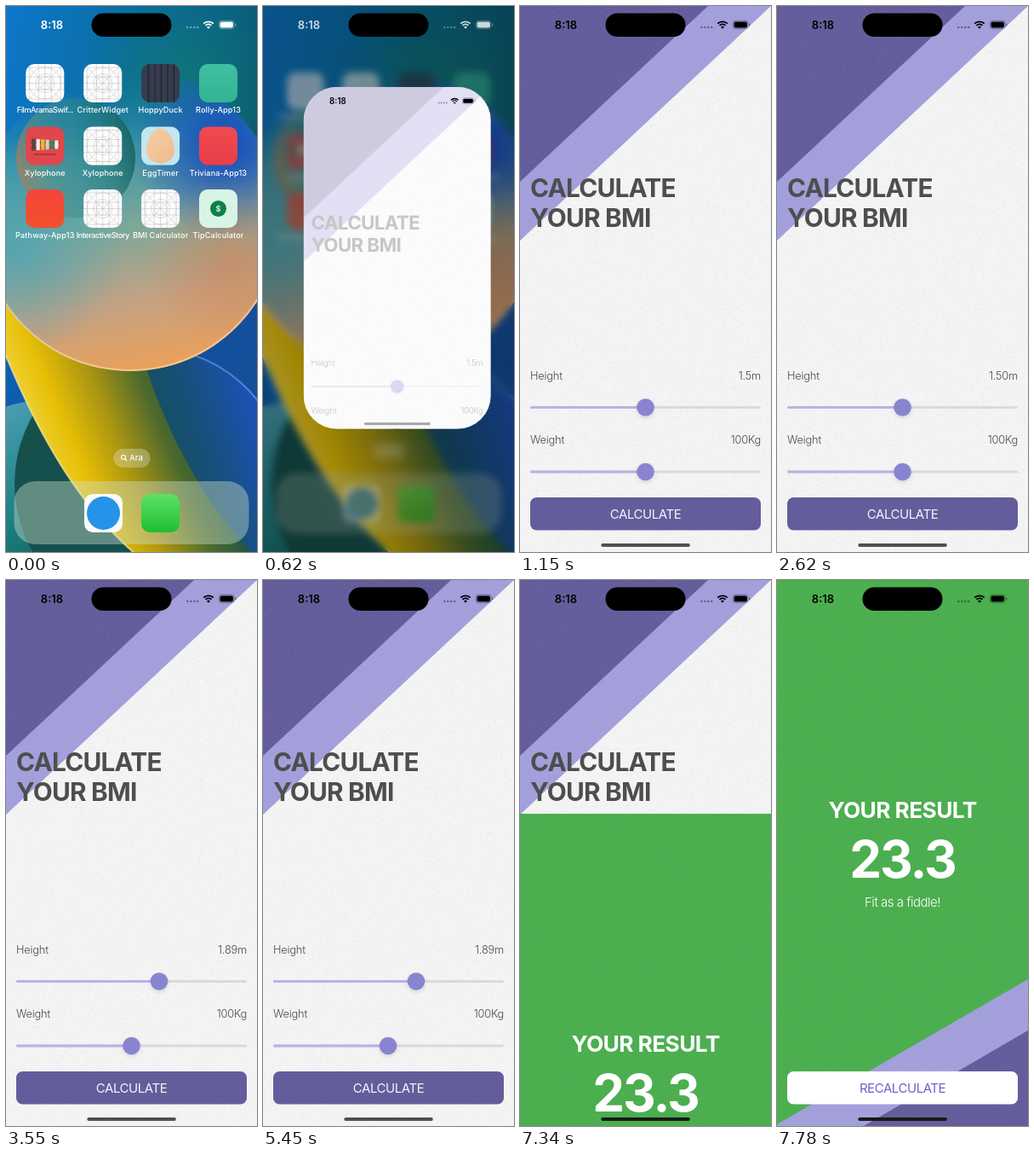
Write an HTML page with a canvas that moves like this. It is 295x640 px and loops after 8000 ms.

```html
<!DOCTYPE html>
<html lang="tr">
<head>
<meta charset="utf-8">
<title>BMI Calculator</title>
<style>
html, body { margin: 0; width: 100%; height: 100%; overflow: hidden; background: #000; }
canvas { display: block; width: 295px; height: 640px; }
</style>
</head>
<body>
<canvas id="stage"></canvas>
<script>
const W = 295, H = 640, LOOP = 8000, TAU = Math.PI * 2;
const FONT = 'Inter, "Liberation Sans", sans-serif';
const DARK = '#645d9b', LIGHT = '#a29fdb', GREEN = '#4bae4f', INK = '#4e4e4e';
const dpr = window.devicePixelRatio || 1;

const STEPS = [0, 500, 620, 720, 830, 940, 1040, 1150, 2620,
  2880, 2990, 3100, 3210, 3330, 3440, 3550,
  5450, 5560, 5670, 5780, 5900, 6120,
  7120, 7230, 7340, 7450, 7560, 7670, 7780];

const clamp = v => Math.max(0, Math.min(1, v));
const lerp = (a, b, k) => a + (b - a) * k;
const smooth = (t, from, to) => { const k = clamp((t - from) / (to - from)); return k * k * (3 - 2 * k); };
// Critically damped spring, 0 to 1.
const spring = (t, start, rate) => {
  const a = Math.max(0, t - start) / 1000 * rate;
  return 1 - (1 + a) * Math.exp(-a);
};

function layer(canvas = document.createElement('canvas')) {
  canvas.width = W * dpr;
  canvas.height = H * dpr;
  const c = canvas.getContext('2d');
  c.scale(dpr, dpr);
  return c;
}

function box(c, x, y, w, h, r, fill) {
  c.beginPath();
  c.roundRect(x, y, w, h, r);
  c.fillStyle = fill;
  c.fill();
}

function disc(c, x, y, r, fill) {
  c.beginPath();
  c.arc(x, y, r, 0, TAU);
  c.fillStyle = fill;
  c.fill();
}

function poly(c, pts, fill) {
  c.beginPath();
  pts.forEach(p => c.lineTo(...p));
  c.fillStyle = fill;
  c.fill();
}

function text(c, str, x, y, size, weight, fill, align = 'center', track = 0) {
  c.font = `${weight} ${size}px ${FONT}`;
  c.letterSpacing = track * size + 'px';
  c.textAlign = align;
  c.textBaseline = 'alphabetic';
  c.fillStyle = fill;
  c.fillText(str, x, y + size * 0.364);
}

function linear(c, x0, y0, x1, y1, ...colors) {
  const g = c.createLinearGradient(x0, y0, x1, y1);
  colors.forEach((col, i) => g.addColorStop(i / (colors.length - 1), col));
  return g;
}

function glow(c, x, y, r, rgb, alpha) {
  const g = c.createRadialGradient(x, y, 0, x, y, r);
  g.addColorStop(0, `rgba(${rgb},${alpha})`);
  g.addColorStop(1, `rgba(${rgb},0)`);
  c.fillStyle = g;
  c.fillRect(x - r, y - r, r * 2, r * 2);
}

// ---------- wallpaper ----------
function drawWallpaper(c) {
  c.fillStyle = linear(c, 0, 60, W, 120, '#0d76c6', '#0a6d9e', '#0b5a72');
  c.fillRect(0, 0, W, H);
  glow(c, 205, 95, 120, '18,122,112', 0.75);
  c.fillStyle = linear(c, 0, 400, W, 640, '#0b62b4', '#144f9e', '#15508c');
  c.fillRect(0, 340, W, 300);

  disc(c, 40, 585, 122, linear(c, 0, 470, 120, 640, '#4a9db4', '#1f8284', '#0f5f58'));

  // Blue rim at the lower right.
  disc(c, 170, 560, 160, linear(c, 150, 520, 300, 470, '#15504c', '#174f78', '#1d52ba'));
  c.beginPath();
  c.arc(170, 560, 159, -1.25, -0.45);
  c.strokeStyle = 'rgba(110,170,240,.6)';
  c.lineWidth = 2;
  c.stroke();

  const ribbon = new Path2D('M-5 330C50 400 130 420 165 425C190 500 235 590 295 645L155 645C90 590 40 510 -5 398');
  c.fillStyle = linear(c, 25, 520, 215, 440, '#f1d84c', '#e6bf05', '#a99412', '#4d6a2c', '#15504c');
  c.fill(ribbon);
  c.strokeStyle = 'rgba(246,236,160,.7)';
  c.lineWidth = 2;
  c.stroke(new Path2D('M155 645C90 590 40 510 -5 398'));

  c.save();
  c.beginPath();
  c.arc(146, 251, 177, 0, TAU);
  c.clip();
  c.fillStyle = linear(c, 110, 80, 175, 430, 'rgba(18,116,170,0)', '#3a93a8', '#7aa79a', '#c3a284', '#eda057');
  c.fillRect(-40, 60, 380, 380);
  glow(c, 258, 165, 110, '20,70,190', 1);
  glow(c, 10, 285, 130, '72,164,184', 0.75);
  glow(c, 265, 300, 100, '205,132,88', 0.6);
  c.restore();
  c.beginPath();
  c.arc(146, 251, 176, 0.15, Math.PI - 0.3);
  c.strokeStyle = 'rgba(255,215,165,.7)';
  c.lineWidth = 2;
  c.stroke();

  disc(c, 82, 178, 70, linear(c, 12, 195, 152, 165, 'rgba(176,126,84,.75)', 'rgba(84,146,136,.6)', 'rgba(56,140,144,.55)', 'rgba(36,122,120,.6)', 'rgba(20,92,84,.8)'));
}

// ---------- home screen ----------
function gridIcon(c, x, y) {
  box(c, x, y, 45, 45, 10, '#fdfdfd');
  c.save();
  c.beginPath();
  c.roundRect(x, y, 45, 45, 10);
  c.clip();
  c.translate(x + 22.5, y + 22.5);
  c.strokeStyle = '#b8b8bc';
  c.lineWidth = 0.5;
  c.beginPath();
  for (const d of [-18.5, -7.5, 0, 7.5, 18.5]) {
    c.moveTo(d, -23); c.lineTo(d, 23);
    c.moveTo(-23, d); c.lineTo(23, d);
  }
  for (const s of [-1, 1]) { c.moveTo(-23, -23 * s); c.lineTo(23, 23 * s); }
  for (const r of [7.5, 11, 18.5]) { c.moveTo(r, 0); c.arc(0, 0, r, 0, TAU); }
  c.stroke();
  c.restore();
}

const plain = (...colors) => (c, x, y) => box(c, x, y, 45, 45, 10, linear(c, x, y, x, y + 45, ...colors));

function planksIcon(c, x, y) {
  box(c, x, y, 45, 45, 10, '#363c4e');
  for (let i = 1; i < 6; i++) {
    c.fillStyle = i % 2 ? '#20242f' : '#272b38';
    c.fillRect(x + i * 7.5, y, 1.5, 45);
  }
}

function barsIcon(c, x, y) {
  box(c, x, y, 45, 45, 10, '#e0474d');
  c.fillStyle = '#6b2a2c';
  c.fillRect(x + 6, y + 18, 33, 1.2);
  c.fillRect(x + 6, y + 24, 33, 1.2);
  ['#54463f', '#f0efe4', '#e7b548', '#d9cfb2', '#2f8a6b', '#f0efe4'].forEach((col, i) =>
    box(c, x + 7 + i * 5.4, y + 14 + i * 0.4, 4.2, 14 - i * 0.8, 1, col));
  c.fillStyle = '#7a2f30';
  c.fillRect(x + 9, y + 32, 26, 1);
}

function eggIcon(c, x, y) {
  box(c, x, y, 45, 45, 10, '#c3e6ef');
  c.beginPath();
  c.moveTo(x + 22.5, y + 2);
  c.bezierCurveTo(x + 32, y + 2, x + 39, y + 17, x + 39, y + 27);
  c.bezierCurveTo(x + 39, y + 48, x + 6, y + 48, x + 6, y + 27);
  c.bezierCurveTo(x + 6, y + 17, x + 13, y + 2, x + 22.5, y + 2);
  c.fillStyle = linear(c, x + 6, y, x + 39, y + 40, '#f6cfa6', '#eebb8e');
  c.fill();
}

function coinIcon(c, x, y) {
  box(c, x, y, 45, 45, 10, '#d8f4e5');
  disc(c, x + 22.5, y + 22.5, 9.5, '#0f7f4b');
  text(c, '$', x + 22.5, y + 22.5, 9, 700, '#d8f4e5');
}

const APPS = [
  ['FilmAramaSwif...', gridIcon], ['CritterWidget', gridIcon], ['HoppyDuck', planksIcon], ['Rolly-App13', plain('#3fc0a0', '#35b394')],
  ['Xylophone', barsIcon], ['Xylophone', gridIcon], ['EggTimer', eggIcon], ['Triviana-App13', plain('#f04a50', '#e83e48')],
  ['Pathway-App13', plain('#f2453c', '#f5502c')], ['InteractiveStory', gridIcon], ['BMI Calculator', gridIcon], ['TipCalculator', coinIcon]
];

function drawHome(c) {
  APPS.forEach(([name, icon], i) => {
    const x = 23.3 + (i % 4) * 67.9, y = 68 + Math.floor(i / 4) * 73.5;
    icon(c, x, y);
    text(c, name, x + 22.5, y + 54, 9.1, 500, '#fff', 'center', name.length > 14 ? -0.05 : 0.015);
  });

  box(c, 126.5, 519, 43, 22, 11, 'rgba(255,255,255,.27)');
  c.strokeStyle = '#fff';
  c.lineWidth = 1.1;
  c.beginPath();
  c.arc(138, 529, 2.5, 0, TAU);
  c.moveTo(140, 531);
  c.lineTo(142.3, 533.3);
  c.stroke();
  text(c, 'Ara', 153, 530, 9.5, 500, '#fff');

  box(c, 9.5, 557, 276, 74, 25, 'rgba(205,225,205,.42)');
  box(c, 92, 572, 45, 45, 10, '#fafafa');
  disc(c, 114.5, 594.5, 19.5, '#2793e8');
  plain('#5ce266', '#1fbe33')(c, 159, 572);
}

// ---------- app screens ----------
function drawStatus(c, color) {
  text(c, '8:18', 54, 22, 13, 600, color);
  c.save();
  c.globalAlpha *= 0.4;
  for (let i = 0; i < 4; i++) disc(c, 213.3 + i * 4, 25, 1.2, color);
  c.restore();

  c.strokeStyle = color;
  c.lineWidth = 1.8;
  for (const r of [5, 8.2]) {
    c.beginPath();
    c.arc(238, 26.5, r, -Math.PI * 0.75, -Math.PI * 0.25);
    c.stroke();
  }
  c.beginPath();
  c.moveTo(238, 26.8);
  c.arc(238, 26.8, 2.8, -Math.PI * 0.75, -Math.PI * 0.25);
  c.fillStyle = color;
  c.fill();

  c.save();
  c.globalAlpha *= 0.4;
  c.lineWidth = 0.8;
  c.beginPath();
  c.roundRect(250.2, 17.3, 18, 9.4, 3);
  c.stroke();
  box(c, 269.2, 20.5, 1.2, 3, 0.6, color);
  c.restore();
  box(c, 251.5, 18.6, 15.4, 6.8, 1.9, color);
}

const grain = (() => {
  const c = layer();
  let seed = 7;
  const rnd = () => (seed = seed * 16807 % 2147483647) / 2147483647;
  for (let i = 0; i < 26000; i++) {
    c.fillStyle = rnd() < 0.62 ? 'rgba(255,255,255,.4)' : 'rgba(0,0,0,.045)';
    c.fillRect(Math.floor(rnd() * W), Math.floor(rnd() * H), 1, 1);
  }
  return c.canvas;
})();

function drawGrain(c, alpha) {
  c.save();
  c.globalAlpha = alpha;
  c.drawImage(grain, 0, 0, W, H);
  c.restore();
}

function slider(c, y, k) {
  const x = 22.5 + 250 * k;
  box(c, 12, y - 1.5, 271, 3, 1.5, '#dadada');
  box(c, 12, y - 1.5, x - 12, 3, 1.5, '#b8b3e6');
  c.save();
  c.shadowColor = 'rgba(0,0,0,.12)';
  c.shadowBlur = 5 * dpr;
  c.shadowOffsetY = 2 * dpr;
  disc(c, x, y, 10.3, '#8984d0');
  c.restore();
}

function row(c, y, name, value) {
  text(c, name, 12, y, 12.8, 300, '#4a4a4a', 'left', -0.015);
  text(c, value, 283, y, 12.8, 300, '#4a4a4a', 'right', -0.015);
}

function drawForm(c, t) {
  const height = lerp(1.5, 1.89, smooth(t, 2800, 3550));
  const weight = lerp(100, 83.2, smooth(t, 5400, 5960));
  c.fillStyle = '#f3f3f3';
  c.fillRect(0, 0, W, H);
  drawGrain(c, 0.8);
  poly(c, [[0, 0], [295, 0], [0, 275]], LIGHT);
  poly(c, [[0, 0], [221, 0], [0, 206]], DARK);
  drawGrain(c, 0.1);

  text(c, 'CALCULATE', 12, 213, 29.8, 700, INK, 'left', -0.026);
  text(c, 'YOUR BMI', 12, 248.5, 29.8, 700, INK, 'left', -0.026);
  row(c, 433, 'Height', t < 2620 ? '1.5m' : height.toFixed(2) + 'm');
  slider(c, 470.5, height / 3);
  row(c, 508.5, 'Weight', weight.toFixed(0) + 'Kg');
  slider(c, 546, weight / 200);
  box(c, 12, 576, 271, 38.5, 7.5, DARK);
  text(c, 'CALCULATE', 147.5, 595.5, 15, 400, t >= 7120 ? '#a9a5c6' : '#f5f4fa', 'center', -0.03);
}

function drawResult(c) {
  c.fillStyle = GREEN;
  c.fillRect(0, 0, W, H);
  poly(c, [[295, 468], [295, 640], [0, 640], [0, 638]], LIGHT);
  poly(c, [[295, 528], [295, 640], [102, 640]], DARK);
  drawGrain(c, 0.1);
  text(c, 'YOUR RESULT', 147.5, 269, 26.3, 700, '#fff', 'center', -0.023);
  text(c, '23.3', 147.5, 327, 60, 700, '#fff', 'center', -0.035);
  text(c, 'Fit as a fiddle!', 147.5, 378, 15, 300, '#fff', 'center', -0.033);
  box(c, 12, 576, 271, 38.5, 7.5, '#fff');
  text(c, 'RECALCULATE', 147.5, 595.5, 15, 400, '#6a63c8', 'center', -0.03);
}

const homeBar = (c, y, color) => box(c, 95.3, y, 104.5, 4, 2, color);

// ---------- scenes ----------
const wall = layer(), home = layer(), form = layer();
drawWallpaper(wall);
drawHome(home);

function drawBackdrop(c, open) {
  c.drawImage(wall.canvas, 0, 0, W, H);
  c.save();
  if (open > 0) {
    c.filter = `blur(${6 * open * dpr}px)`;
    c.drawImage(wall.canvas, 0, 0, W, H);
  }
  const s = 1 - 0.057 * open;
  c.globalAlpha = 1 - 0.5 * open;
  c.translate(W / 2, H / 2);
  c.scale(s, s);
  c.drawImage(home.canvas, -W / 2, -H / 2, W, H);
  c.restore();
  c.fillStyle = `rgba(0,0,0,${0.6 * open * open})`;
  c.fillRect(0, 0, W, H);
  c.save();
  c.globalAlpha = 1 - 0.3 * open;
  drawStatus(c, '#fff');
  c.restore();
}

function drawLaunch(c, t) {
  const k = spring(t, 455, 14.8), kh = spring(t, 481, 14.5);
  drawBackdrop(c, k);
  const w = lerp(45, W, k), h = Math.max(lerp(45, H, kh), w);
  const x = lerp(181.5, W / 2, k) - w / 2, y = lerp(237.5, H / 2, k) - h / 2;
  const s = w / W, shown = clamp((t - 560) / 190);
  c.save();
  c.beginPath();
  c.roundRect(x, y, w, h, lerp(10, 52, k) * Math.min(1, (1 - k) * 5 + 0.5));
  c.clip();
  c.fillStyle = '#fff';
  c.fillRect(x, y, w, h);
  c.translate(x, y);
  if (shown === 0) {
    c.save();
    c.globalAlpha = clamp(1 - k * 2);
    c.scale(w / 45, w / 45);
    gridIcon(c, 0, 0);
    c.restore();
  } else {
    c.scale(s, s);
    drawForm(form, t);
    c.globalAlpha = shown;
    c.drawImage(form.canvas, 0, 0, W, H);
    c.globalAlpha = 1;
    drawStatus(c, '#000');
    c.globalAlpha = Math.min(1, shown * 1.6);
    homeBar(c, h / s - 10, '#505050');
  }
  c.restore();
}

function drawAt(c, t) {
  if (t < 500) {
    drawBackdrop(c, 0);
  } else if (t < 1150) {
    drawLaunch(c, t);
  } else {
    drawForm(c, t);
    if (t > 7200) {
      c.save();
      c.translate(0, t >= 7780 ? 0 : H * (1 - spring(t, 7220, 16)));
      drawResult(c);
      c.restore();
    }
    drawStatus(c, '#000');
    homeBar(c, 630, t > 7200 ? '#141a16' : '#505050');
  }
  box(c, 100.5, 8.5, 94, 27.5, 13.75, '#000');
}

const stage = layer(document.getElementById('stage'));
const began = performance.now();
let last = -1;

function tick() {
  const t = (performance.now() - began) % LOOP;
  const step = STEPS.findLast(s => s <= t) ?? 0;
  if (step !== last) {
    last = step;
    drawAt(stage, step);
  }
  requestAnimationFrame(tick);
}
tick();
</script>
</body>
</html>
```
